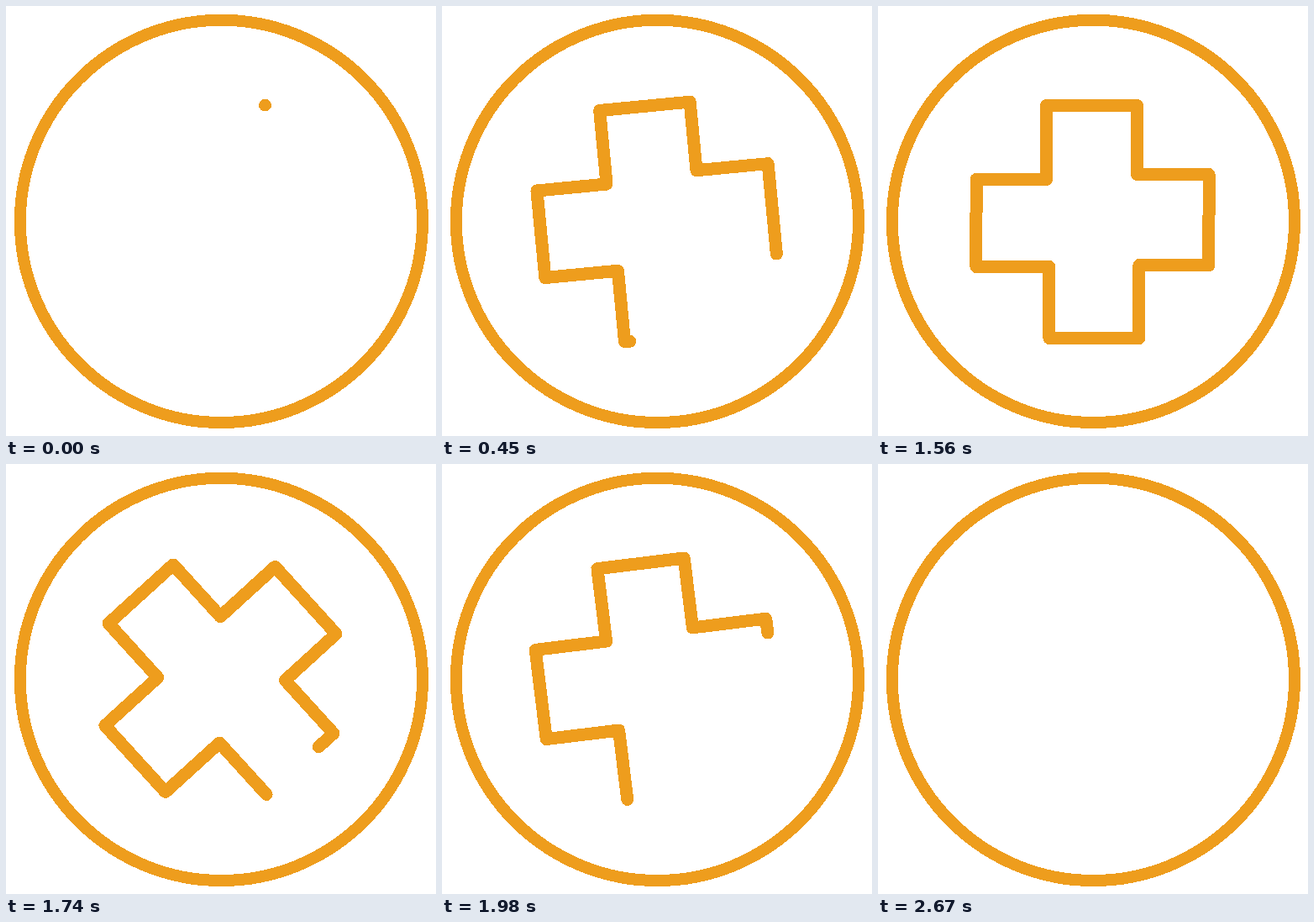
An HTML page with a canvas that plays this animation: 512 by 512 pixels, repeating every 2.7 s.

```html
<!DOCTYPE html>
<html lang="en">
<head>
<meta charset="utf-8">
<title>Medical cross</title>
<style>
  html, body { margin: 0; width: 100%; height: 100%; overflow: hidden; background: #fff; }
  canvas { display: block; width: 512px; height: 512px; filter: url(#crisp); }
  svg { position: absolute; }
</style>
</head>
<body>
<svg width="0" height="0">
  <!-- Hard edges: every pixel is either fully painted or empty. -->
  <filter id="crisp" x="0" y="0" width="1" height="1" color-interpolation-filters="sRGB">
    <feComponentTransfer><feFuncA type="discrete" tableValues="0 1"/></feComponentTransfer>
  </filter>
</svg>
<canvas id="stage" width="512" height="512"></canvas>
<script>
const ctx = document.getElementById('stage').getContext('2d');
const COLOR = '#ee9d1d';
const CENTER = 256;
const LOOP = 2700, STEP = 30;
const INTRO = -0.2, OUTRO = 51.75; // start of each phase, in steps

// Each arm of the cross reaches from two neighbouring inner corners to its tip.
const tip = { right: 394, top: 118.5, left: 117, bottom: 395.5 };
const inner = [[311, 308.5], [308.5, 200.5], [200.5, 206.5], [204, 310.5]];

const points = Object.values(tip).flatMap((edge, arm) => {
  const reach = ([x, y]) => arm % 2 ? [x, edge] : [edge, y];
  const next = inner[(arm + 1) % 4];
  return [reach(inner[arm]), reach(next), next];
});
points.push(points[0]);

const outline = new Path2D();
points.forEach(([x, y]) => outline.lineTo(x, y));
const total = points.slice(1).reduce(
  (sum, [x, y], i) => sum + Math.hypot(x - points[i][0], y - points[i][1]), 0);

const progress = (step, start, length) => Math.min(1, Math.max(0, (step - start) / length));
const smooth = s => s * s * (3 - 2 * s);

// Same as cubic-bezier(1/3, 0, 0, 1).
function settle(x) {
  let lo = 0, hi = 1;
  for (let i = 0; i < 30; i++) {
    const s = (lo + hi) / 2;
    if (s * (1 - s) ** 2 + s ** 3 < x) lo = s; else hi = s;
  }
  return smooth(hi);
}

function drawRing() {
  ctx.setLineDash([]);
  ctx.lineWidth = 14;
  ctx.beginPath();
  ctx.arc(CENTER + 0.4, CENTER + 0.4, 239.6, 0, Math.PI * 2);
  ctx.stroke();
}

function drawCross(step) {
  const from = total * smooth(progress(step, OUTRO, 37));
  const to = total * settle(progress(step, INTRO, 39.8));
  if (to <= from) return;

  const turns = settle(progress(step, INTRO, 24)) + settle(progress(step, OUTRO, 24)) - 1;
  ctx.save();
  ctx.translate(CENTER, CENTER);
  ctx.rotate(turns * Math.PI / 2);
  ctx.translate(-CENTER, -CENTER);
  ctx.lineWidth = 15;
  ctx.lineCap = ctx.lineJoin = 'round';
  ctx.setLineDash([to - from, total * 2]);
  ctx.lineDashOffset = -from;
  ctx.stroke(outline);
  ctx.restore();
}

function tick() {
  const step = Math.floor((performance.now() % LOOP + 0.01) / STEP);
  ctx.clearRect(0, 0, 512, 512);
  ctx.strokeStyle = COLOR;
  drawRing();
  drawCross(step);
  requestAnimationFrame(tick);
}
tick();
</script>
</body>
</html>
```
